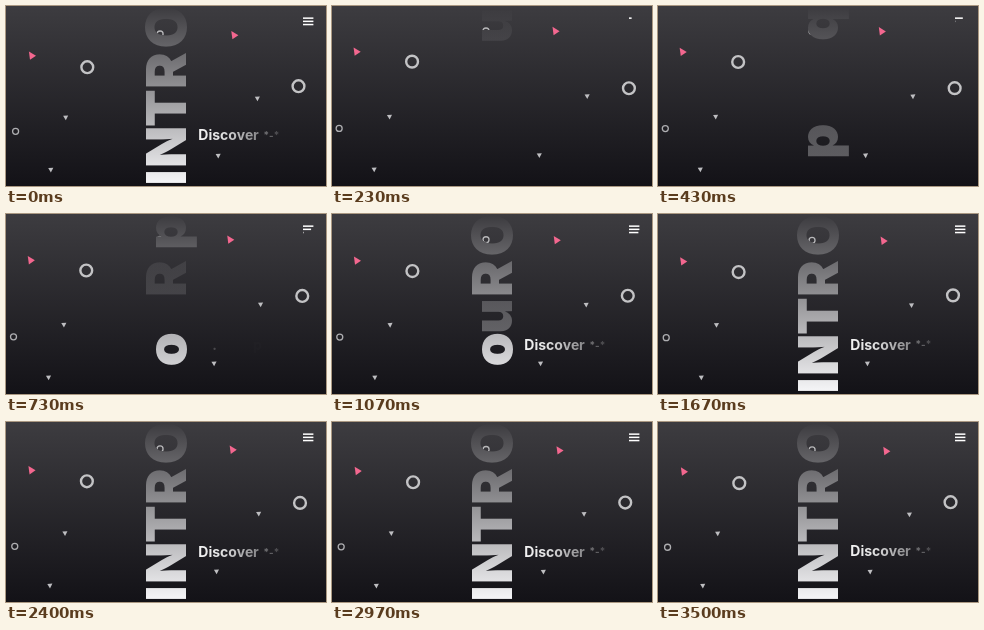
An HTML page with a canvas that plays this animation: 320x180 px, repeating every 3530 ms.

```html
<!DOCTYPE html>
<html lang="en">
<head>
<meta charset="utf-8">
<title>Intro</title>
<style>
html, body { margin: 0; width: 100%; height: 100%; overflow: hidden; background: #131217; }
canvas { display: block; width: 320px; height: 180px; }
</style>
</head>
<body>
<canvas id="stage"></canvas>
<script>
const W = 320, H = 180, LOOP = 3530, CUT = 30;
const canvas = document.getElementById('stage');
const ctx = canvas.getContext('2d');
const dpr = window.devicePixelRatio || 1;
canvas.width = W * dpr;
canvas.height = H * dpr;

const clamp = v => Math.max(0, Math.min(1, v));
const lerp = (a, b, p) => a + (b - a) * p;
const ramp = (t, start, length) => clamp((t - start) / length);

function gradient(x, y, ...stops) {
  const g = ctx.createLinearGradient(0, 0, x, y);
  stops.forEach((c, i) => g.addColorStop(i / (stops.length - 1), c));
  return g;
}
const backdrop = gradient(0, H, '#3d3c40', '#131217');
// The same tones in the space of the text turned by a quarter
const sideBackdrop = gradient(-H, 0, '#3d3c40', '#131217');
const sideFill = gradient(-H, 0, '#3b3a3e', '#f8f8fa');
const labelFill = ctx.createLinearGradient(192, 0, 273, 0);
labelFill.addColorStop(0, 'rgba(255,255,255,.95)');
labelFill.addColorStop(0.3, 'rgba(255,255,255,.86)');
labelFill.addColorStop(0.75, 'rgba(255,255,255,.46)');
labelFill.addColorStop(1, 'rgba(255,255,255,.18)');

// Start and end of each drift
const rings = [
  { from: [80, 55.3], to: [81.3, 61.2], r: 5.9, w: 2.4, color: '#c3c3c5' },
  { from: [297.2, 82.4], to: [292.5, 80.2], r: 5.9, w: 2.4, color: '#c3c3c5' },
  { from: [7, 122.2], to: [9.6, 125.3], r: 3, w: 1.3, color: '#aeaeb1' },
  { from: [154, 24.8], to: [154.1, 28], r: 3, w: 1.3, color: '#b8b8ba' }
];
const arrow = [-3.3, -4, 3.8, 0.3, -2.2, 4.4];
const wedge = [-2.6, -2, 2.5, -2.3, 0.1, 2.5];
const triangles = [
  { from: [24.8, 45.2], to: [26.2, 49.4], shape: arrow, color: '#f3678f' },
  { from: [223.5, 24.6], to: [228.6, 28.9], shape: arrow, color: '#f3678f' },
  { from: [57.4, 110.9], to: [59.7, 111.7], shape: wedge, color: '#bebec1' },
  { from: [42, 163.7], to: [44.8, 164], shape: wedge, color: '#bebec1' },
  { from: [255.4, 90.4], to: [251.4, 92.7], shape: wedge, color: '#bebec1' },
  { from: [207, 149.6], to: [212.2, 150], shape: wedge, color: '#bebec1' }
];

// Steps: time, glyph, centre on the vertical axis
const title = [
  { start: 50, steps: [[50, 'u', 20], [300, 'q', 18], [570, 'p', 18], [900, 'O', 21.5]] },
  { start: 600, steps: [[600, 'R', 63.5]] },
  { start: 880, length: 440, steps: [[880, 'u', 102.5], [1170, 'T', 102]] },
  { start: 255, steps: [[255, 'p', 135], [570, 'o', 135.5], [1130, 'N', 141]] },
  { start: 1160, length: 440, steps: [[1160, 'I', 171.5]] }
];
const label = 'Discover';
const noise = '.odrupce';

function drawRing({ from, to, r, w, color }, p) {
  ctx.beginPath();
  ctx.arc(lerp(from[0], to[0], p), lerp(from[1], to[1], p), r, 0, Math.PI * 2);
  ctx.lineWidth = w;
  ctx.strokeStyle = color;
  ctx.stroke();
}

function drawTriangle({ from, to, shape, color }, p) {
  const x = lerp(from[0], to[0], p), y = lerp(from[1], to[1], p);
  ctx.beginPath();
  for (let i = 0; i < 6; i += 2) ctx.lineTo(x + shape[i], y + shape[i + 1]);
  ctx.fillStyle = color;
  ctx.fill();
}

function drawTitle(t) {
  ctx.save();
  ctx.translate(180.1, 0);
  ctx.rotate(-Math.PI / 2);
  ctx.font = '900 55px Inter, sans-serif';
  for (const { start, length = 500, steps } of title) {
    const step = steps.filter(s => s[0] <= t).pop();
    if (!step) continue;
    const [, glyph, y] = step;
    const m = ctx.measureText(glyph);
    const x = -y - (m.actualBoundingBoxRight - m.actualBoundingBoxLeft) / 2;
    ctx.fillStyle = sideBackdrop;
    ctx.fillText(glyph, x, 0);
    ctx.globalAlpha = ramp(t, start, length);
    ctx.fillStyle = sideFill;
    ctx.fillText(glyph, x, 0);
    ctx.globalAlpha = 1;
  }
  ctx.restore();
}

function drawLabel(t, p) {
  const y = lerp(136.9, 134.2, p);
  ctx.fillStyle = labelFill;
  ctx.font = '700 14px Inter, sans-serif';
  for (let i = 0; i < label.length; i++) {
    const start = 700 + (i * 5 + 6) % 8 * 28;
    const glyph = t < start + 110 ? noise[(i + 6) % 8] : label[i];
    ctx.globalAlpha = ramp(t, start, 140);
    ctx.fillText(glyph, 192.3 + ctx.measureText(label.slice(0, i)).width, y);
  }
  ctx.globalAlpha = ramp(t, 900, 150);
  ctx.font = '700 10px Inter, sans-serif';
  ctx.fillText('*-*', 257.5, y - 1.5);
  ctx.globalAlpha = 1;
}

function drawMenu(t) {
  ctx.fillStyle = '#fff';
  for (let i = 0; i < 3; i++) {
    ctx.fillRect(297, 11.4 + i * 3.2, 10.4 * ramp(t, 130 + i * 290, 400), 1.5);
  }
}

function draw(time) {
  let t = time % LOOP;
  if (t < CUT) t += LOOP;
  const p = (t - CUT) / (LOOP - CUT);
  ctx.setTransform(dpr, 0, 0, dpr, 0, 0);
  ctx.fillStyle = backdrop;
  ctx.fillRect(0, 0, W, H);
  rings.forEach(r => drawRing(r, p));
  triangles.forEach(s => drawTriangle(s, p));
  drawTitle(t);
  drawLabel(t, p);
  drawMenu(t);
}

const origin = performance.now();
function tick() {
  draw(performance.now() - origin);
  requestAnimationFrame(tick);
}
tick();
</script>
</body>
</html>
```
